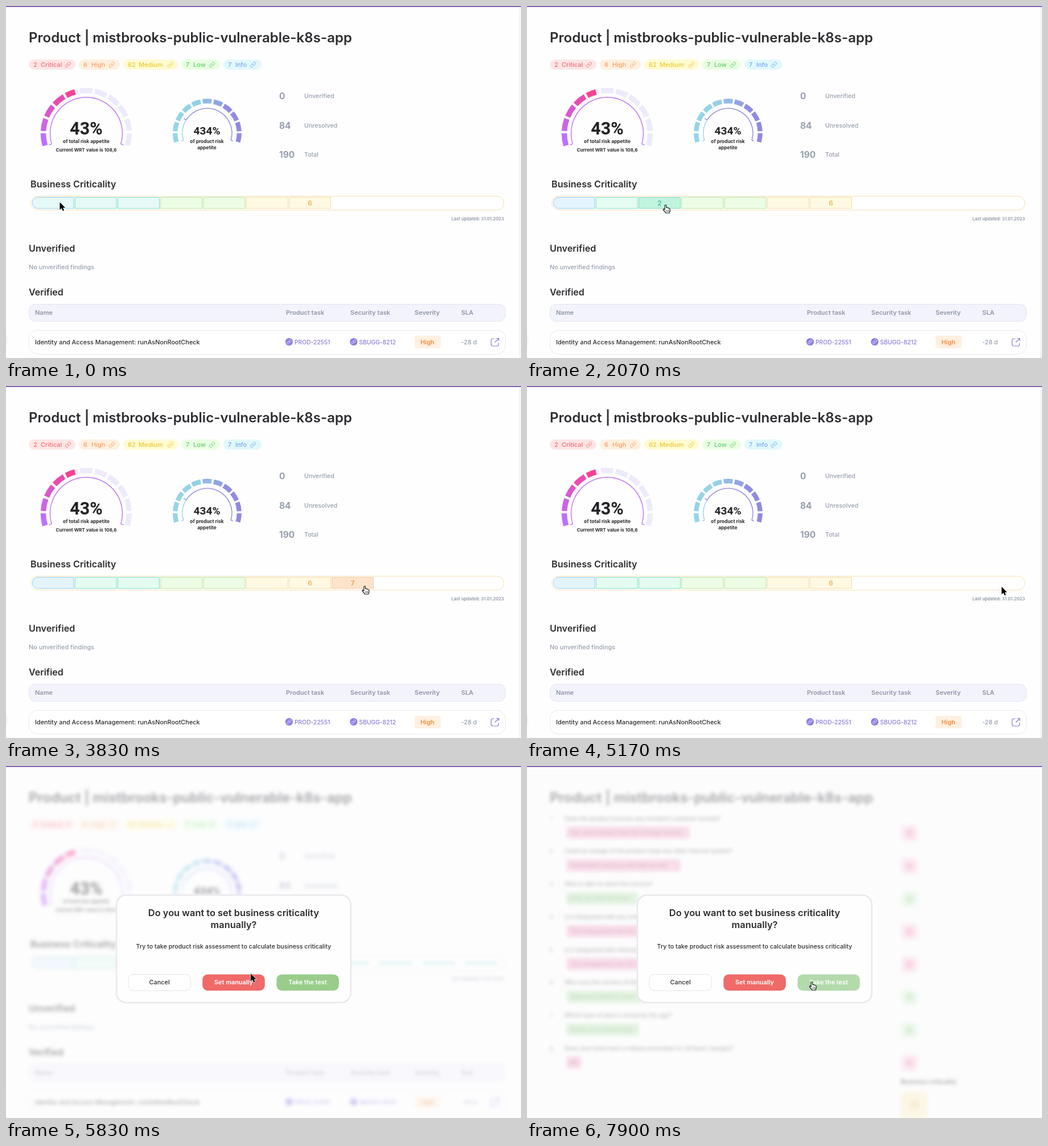
Write an HTML page that moves like this. It is 905x619 px and loops after 8 s.

```html
<!DOCTYPE html>
<html lang="en">
<head>
<meta charset="utf-8">
<title>Product risk</title>
<style>
html, body { margin: 0; width: 100%; height: 100%; overflow: hidden; background: #fefefe; }
svg { display: block; width: 100%; height: 100%; font-family: Inter, sans-serif; }
</style>
</head>
<body>
<svg id="stage" viewBox="0 0 905 619" xmlns="http://www.w3.org/2000/svg"></svg>
<script>
const LOOP = 8000;
const INK = '#2d2d31', GREY = '#979fae';

const text = (x, y, str, size, weight = 500, fill = INK, extra = '') =>
  `<text x="${x}" y="${y}" font-size="${size}" font-weight="${weight}" fill="${fill}" ${extra}>${str}</text>`;
const mid = (x, y, str, size, weight, fill, extra = '') =>
  text(x, y, str, size, weight, fill, 'text-anchor="middle" ' + extra);
const box = (x, y, w, h, r, fill, stroke = 'none', extra = '') =>
  `<rect x="${x}" y="${y}" width="${w}" height="${h}" rx="${r}" fill="${fill}" stroke="${stroke}" ${extra}/>`;
const line = (d, stroke, width, extra = '') =>
  `<path d="${d}" fill="none" stroke="${stroke}" stroke-width="${width}" ${extra}/>`;
const times = (n, fn) => Array.from({ length: n }, (_, i) => fn(i)).join('');

const link = (x, y, scale, color) => line(
  'M10 13a5 5 0 0 0 7.54.54l3-3a5 5 0 0 0-7.07-7.07l-1.72 1.71M14 11a5 5 0 0 0-7.54-.54l-3 3a5 5 0 0 0 7.07 7.07l1.71-1.71',
  color, 2, `stroke-linecap="round" transform="translate(${x} ${y}) scale(${scale}) translate(-12 -12)"`);

// Gauges: angles in degrees, clockwise from the top
const SWEEP = 216, CELLS = 11;
const polar = (cx, cy, r, deg) => {
  const a = deg * Math.PI / 180;
  return (cx + r * Math.sin(a)).toFixed(2) + ' ' + (cy - r * Math.cos(a)).toFixed(2);
};
const arc = (cx, cy, r, from, to) =>
  `M${polar(cx, cy, r, from)}A${r} ${r} 0 ${to - from > 180 ? 1 : 0} 1 ${polar(cx, cy, r, to)}`;
const spoke = (cx, cy, r, deg, len) => `M${polar(cx, cy, r, deg)}L${polar(cx, cy, r + len, deg)}`;
const mix = (a, b, k) => `rgb(${a.map((v, i) => Math.round(v + (b[i] - v) * k))})`;

function ring(cx, cy, r, width, gap, share, color, rest) {
  const step = SWEEP / CELLS, stop = -SWEEP / 2 + SWEEP * share;
  return times(CELLS, i => {
    const from = -SWEEP / 2 + step * i + gap / 2, to = from + step - gap;
    return (to > stop ? line(arc(cx, cy, r, from, to), rest, width) : '') +
      (from < stop ? line(arc(cx, cy, r, from, Math.min(to, stop)), color(i), width) : '');
  });
}

const gauges =
  ring(141, 224, 75.5, 9.5, 3.2, .43, i => mix([187, 112, 255], [246, 66, 148], i / 4), '#edebfb') +
  line(arc(141, 224, 63.5, -107, 107) + spoke(141, 224, 63.5, -107, 5) + spoke(141, 224, 63.5, 107, 5), '#b86cf4', 1.3) +
  mid(141, 226, '43%', 30.5, 700, '#232326', 'font-family="Roboto, sans-serif"') +
  mid(141, 241, 'of total risk appetite', 8.4, 700) +
  mid(141, 256, 'Current WRT value is 108,6', 8.1, 700) +
  ring(353.5, 223.5, 56.3, 8.3, 3.6, 1,
    i => mix([149, 213, 231], [145, 137, 228], Math.min(1, Math.max(0, (i - 3.8) / 3.4))), '#eee') +
  line(arc(353.5, 223.5, 43.5, -107, -58) + spoke(353.5, 223.5, 43.5, -107, 4), '#8fc9e8', 1.2) +
  line(arc(353.5, 223.5, 43.5, -58, 107) + spoke(353.5, 223.5, 43.5, -58, 5) + spoke(353.5, 223.5, 43.5, 107, 4), '#8a84de', 1.3) +
  mid(353, 225.5, '434%', 19.2, 700, '#232326', 'font-family="Roboto, sans-serif"') +
  mid(353, 241, 'of product risk', 8.3, 700) +
  mid(353, 251.5, 'appetite', 8.3, 700);

const chips = [
  [40, 82, 2, 'Critical', 61, 109, '#ffe6e6', '#f66a72'],
  [128, 72, 6, 'High', 150, 186, '#fff0e0', '#f7a066'],
  [206, 96, 62, 'Medium', 233, 289, '#fffbd2', '#ebc935'],
  [308, 68, 7, 'Low', 329, 362, '#e9ffe2', '#62cc70'],
  [382, 67, 7, 'Info', 403, 434, '#e2f8fb', '#76a8ee']
].map(([x, w, n, name, nx, ix, bg, fg]) =>
  box(x, 94, w, 18, 9, bg) + text(x + 8, 107, n, 11, 500, fg) +
  text(nx, 107, name, 11, 500, fg) + link(ix, 103.3, .46, fg)).join('');

const stats = [[0, 'Unverified'], [84, 'Unresolved'], [190, 'Total']].map(([n, name], i) =>
  text(480, 164 + 51.5 * i, n, 15.5, 700, GREY) + text(524, 162 + 51.5 * i, name, 10.7, 500, GREY)).join('');

// Criticality scale: idle fill, hover fill, border, label
const tones = [
  ['#e4f4fe', '#c5e6fb', '#95cdf2', '#5ba9e0'],
  ['#e4fcf1', '#c1f3df', '#80dcc4', '#42c99c'],
  ['#edfde5', '#d5f5c2', '#b5e3a0', '#86c866'],
  ['#fff9e3', '#faecd0', '#f3dba6', '#eeb563'],
  ['#fff', '#fde3cc', '#f6c79c', '#f09a4e'],
  ['#fff', '#fbd5d5', '#f2aaaa', '#ea6a6a']
];
const SEG = 75.25, segX = i => 46 + SEG * i;
const tone = i => tones[Math.ceil(i / 2)];
const segs = times(11, i => {
  const x = segX(i), [, , edge, label] = tone(i);
  const shape = i === 0 ? `M${x + 10} 336.5H119V356H${x + 10}A9.75 9.75 0 0 1 ${x + 10} 336.5Z`
    : i === 10 ? `M${x} 336.5h63a9.75 9.75 0 0 1 0 19.5h-63Z` : `M${x} 336.5h73v19.5h-73Z`;
  return `<g class="seg"><path d="${shape}" stroke="${edge}"/>${mid(x + 36.5, 350.7, i, 12, 600, label)}</g>`;
});

const task = (x, id) => `<circle cx="${x}" cy="590.5" r="6.6" fill="#8b7ee0"/>` +
  link(x, 590.5, .37, '#fff') + text(x + 9.5, 594.5, id, 10.3, 500, '#8c7dd8');
const table = box(40.5, 524.5, 837, 30, 11, '#f3f3fc', '#e3e3f2') +
  [[51, 'Name'], [492, 'Product task'], [605, 'Security task'], [718, 'Severity'], [800, 'SLA']]
    .map(([x, s]) => text(x, 543, s, 11, 600, '#9096a8')).join('') +
  box(40.5, 570.5, 837, 41.5, 14, '#fff', '#e9e9f0') + box(-20, 574.5, 21.5, 26, 9, 'none', '#e9e9f0') +
  text(51, 594.5, 'Identity and Access Management: runAsNonRootCheck', 10.9) +
  task(497.5, 'PROD-22551') + task(611, 'SBUGG-8212') +
  box(718, 580, 46, 22, 4, '#fff0df') + mid(740.5, 594.7, 'High', 11, 600, '#f28b40') +
  text(800, 594.5, '-28 d', 10.7, 500, GREY) +
  line('M858 585H855.5Q852.5 585 852.5 588V595Q852.5 598 855.5 598H862.5Q865.5 598 865.5 595V592.5M859 591.5L866 584.5M861.5 584.5H866V589', '#8c7dd8', 1.2);

const product = chips + gauges + stats +
  text(43, 318.5, 'Business Criticality', 16.2, 600) +
  box(43.5, 334.5, 831.5, 24.5, 12.2, '#fff', '#f7e0b2') + segs +
  text(875, 377, 'Last updated: 31.01.2023', 7.6, 600, '#8d96a6', 'text-anchor="end"') +
  text(40, 431.5, 'Unverified', 16.2, 600) + text(40, 463.3, 'No unverified findings', 10.9, 500, GREY) +
  text(40, 508.5, 'Verified', 16, 600) + table;

// Assessment page, only seen behind the dialog: question, answer, answer width, good
const quiz = [
  ['Does the product process any sensitive customer records?', 'Yes, and it keeps them for a longer period', 217, 0],
  ['Could an outage of the product stop any other internal system?', 'Dependent services will stop as well', 201, 0],
  ['Who is able to reach the service?', 'Only our internal team', 126, 1],
  ['Is it integrated with any external services?', 'Two integrations are live', 150, 0],
  ['Is it integrated with internal services?', 'Two integrations are live', 150, 0],
  ['Who runs the servers of the product?', 'Approved platform team', 140, 1],
  ['Which type of data is stored by the app?', 'Public or no stored data', 128, 1],
  ['Does your team have a release procedure to roll back changes?', 'No', 27, 0]
].map(([q, a, w, good], i) => {
  const y = 92 + 57.75 * i, bg = good ? '#c3e8bc' : '#f4b6d0', fg = good ? '#6fa868' : '#b8487c';
  return text(40, y + 3.5, i + 1, 9.5, 500, '#777') + text(66, y + 3.5, q, 9.8, 500, '#555') +
    box(69, y + 14, w, 22, 5, bg) + text(76, y + 28.5, a, 9.8, 500, fg) +
    box(657, y + 11, 30, 30, 8, good ? '#e2f7de' : '#fcd9e6') +
    `<circle cx="672" cy="${y + 26}" r="8" fill="${good ? '#b5e3ad' : '#f6a5c6'}"/>`;
}).join('') + text(657, 559, 'Business criticality', 10.7, 600) +
  box(657, 573, 47, 47, 6, '#fdf0c4') + '<circle cx="681" cy="596" r="9" fill="#f7dc9c"/>';

const button = (id, x, label, fill, fg, weight, stroke) =>
  box(x, 366.5, 109.5, 28.5, 9, fill, stroke, `id="${id}"`) + mid(x + 54.7, 384.3, label, 10.9, weight, fg);
const dialog = box(194, 227, 412, 189, 17, '#fefefe', '#e9e9ed', 'stroke-width="2.6"') +
  mid(400, 264, 'Do you want to set business criticality', 16.4, 600) + mid(400, 284.5, 'manually?', 16.4, 600) +
  mid(400, 321, 'Try to take product risk assessment to calculate business criticality', 10.7, 500) +
  button('cancel', 215, 'Cancel', '#fff', INK, 500, '#e6e6ec') +
  button('manual', 345.3, 'Set manually', '#ef6a69', '#fff', 600) +
  button('test', 475.4, 'Take the test', '#9acd8b', '#fff', 600);

const hand = 'M-1.3 8.5V1Q-1.3-.3 0-.3 1.3-.3 1.3 1V4.6Q3.3 3.8 3.6 5.2 5.4 4.6 5.8 6 7.7 5.7 7.8 7.4V10Q7.8 11.6 6.8 12.4V14H0V13Q-1.8 11.6-4 8.4-4.4 7-3 6.9-2 7-1.3 8.5Z';

const stage = document.getElementById('stage');
stage.innerHTML = `
  <filter id="soft" filterUnits="userSpaceOnUse" x="-20" y="-20" width="945" height="659" color-interpolation-filters="sRGB">
    <feGaussianBlur id="blur" stdDeviation="3.3"/></filter>
  <rect width="905" height="619" fill="#fefefe"/>
  <g id="page">
    ${text(40, 64, 'Product | mistbrooks-public-vulnerable-k8s-app', 24.1, 600)}
    <g id="product">${product}</g><g id="quiz">${quiz}</g>
    <path id="edge" d="M903 2V619" stroke="#ececf0" stroke-width="1.5"/>
  </g>
  <rect id="veil" width="905" height="619" fill="#fbfbfd"/>
  <g id="traces" filter="url(#soft)">${times(4, i => box(segX(i + 7) + 8, 344, 58, 5, 2, '#e2f3f2'))}</g>
  <rect width="905" height="1.6" fill="#6c41a5"/>
  <g id="dialog">${dialog}</g>
  <g id="cursor">
    <path id="arrow" d="M0 0V13.5L3.1 10.6 5.2 15.3 7.6 14.3 5.5 9.8H9.6Z" fill="#000" stroke="#fff" stroke-width="1.2" paint-order="stroke"/>
    <g id="hand"><path d="${hand}" fill="#fff" stroke="#111" stroke-width="1.1" stroke-linejoin="round"/>
    ${line('M1.6 9V11.8M3.6 9V11.8M5.6 9V11.8', '#111', .8)}</g>
  </g>`;
const $ = id => document.getElementById(id);
const segNodes = [...stage.querySelectorAll('.seg')];

const bursts = [[0, 0, 1], [150, 150, 1], [590, 1480, 7], [1920, 2950, 8], [3100, 3100, 1], [3390, 4280, 7],
  [4580, 5620, 8], [5830, 5980, 2], [6280, 7310, 8], [7450, 7600, 2], [7900, 7900, 1]];
function snap(t) {
  let s = 0;
  for (const [from, to, n] of bursts)
    for (let i = 0; i < n; i++) {
      const at = Math.floor((from + (n > 1 ? (to - from) * i / (n - 1) : 0)) / 10) * 10;
      if (at <= t) s = at;
    }
  return s;
}

// Cursor tip: time, x, y
const path = [[0, 94.5, 345], [150, 94, 344.6], [590, 97, 350], [890, 112, 350], [1030, 126, 350], [1180, 148, 350],
  [1330, 197, 350], [1480, 206, 350], [1920, 215, 350], [2220, 276, 350], [2500, 426, 350], [2650, 455, 350],
  [2800, 486, 350], [2950, 511, 351], [3390, 530, 352], [3690, 585, 352], [4130, 727, 352], [4280, 742, 352],
  [4580, 756, 352], [4870, 812, 352], [5020, 834, 352], [5170, 834, 353], [5470, 833.5, 353], [5620, 560, 340],
  [5830, 430, 365], [5980, 353, 381], [6280, 356, 381], [6720, 366.5, 380], [7020, 420, 380], [7310, 497, 380],
  [7600, 500.5, 380]];
function tip(t) {
  const i = path.findIndex(p => p[0] > t);
  if (i < 0) return path[path.length - 1].slice(1);
  if (i === 0) return path[0].slice(1);
  const [t0, x0, y0] = path[i - 1], [t1, x1, y1] = path[i], k = (t - t0) / (t1 - t0);
  return [x0 + (x1 - x0) * k, y0 + (y1 - y0) * k];
}

const show = (id, on) => $(id).setAttribute('display', on ? 'inline' : 'none');

function render(t) {
  const s = snap(t), [x, y] = tip(s);
  const pointing = (s >= 590 && s < 5170) || s >= 5980;

  // The highlight trails the cursor by one refresh
  const over = s >= 590 && s < 5170 ? Math.floor((tip(s - 150)[0] - 45) / SEG) : -1;
  segNodes.forEach((node, i) => {
    const on = i === over, fresh = i < 3 && s < [590, 1030, 1480][i];
    const [idle, hover] = tone(i);
    node.firstChild.setAttribute('fill', on ? hover : fresh ? '#e6f9f6' : idle);
    node.lastChild.setAttribute('display', on || i === 6 ? 'inline' : 'none');
    node.setAttribute('display', on || i < 7 ? 'inline' : 'none');
  });

  const open = s >= 5320, test = s >= 7900;
  const left = s < 5470 ? .7 : s < 5620 ? .2 : s < 5830 ? .03 : 0;
  show('dialog', open);
  show('veil', open);
  show('traces', open && !test);
  show('product', !test);
  show('quiz', test);
  show('edge', !open);
  if (open) $('page').setAttribute('filter', 'url(#soft)');
  else $('page').removeAttribute('filter');
  $('blur').setAttribute('stdDeviation', s < 5470 ? 2 : 3.3);
  $('veil').setAttribute('opacity', s < 5470 ? .35 : .58);
  $('dialog').setAttribute('opacity', 1 - left);
  $('dialog').setAttribute('transform',
    `translate(400 ${321.5 + 12.5 * left}) scale(${1 - .46 * left}) translate(-400 -321.5)`);
  $('manual').setAttribute('fill', s >= 6280 && x < 455 ? '#f38c88' : '#ef6a69');
  $('test').setAttribute('fill', s >= 6280 && x > 475 ? '#b3daab' : '#9acd8b');

  $('cursor').setAttribute('transform', `translate(${x} ${y})`);
  show('hand', pointing);
  show('arrow', !pointing);
}

const start = performance.now();
function tick() {
  render((performance.now() - start) % LOOP);
  requestAnimationFrame(tick);
}
tick();
</script>
</body>
</html>
```
